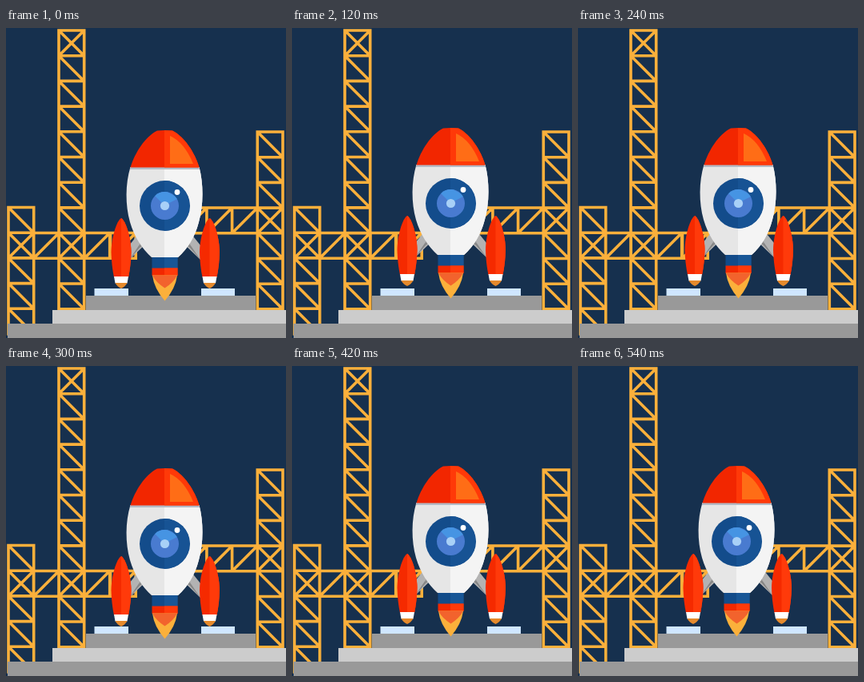
An HTML page for the animation above (600 ms loop, 350 by 388 pixels).

```html
<!DOCTYPE html>
<html lang="en">
<head>
<meta charset="utf-8">
<title>Rocket on the launch pad</title>
<style>
  html, body { margin: 0; width: 350px; height: 388px; overflow: hidden; background: #16304e; }
  svg { display: block; }
</style>
</head>
<body>
<svg width="350" height="388" viewBox="0 0 350 388">
  <defs>
    <clipPath id="rightHalf"><path d="M198 120H260V345H198z"/></clipPath>
    <clipPath id="lens"><circle cx="198.5" cy="222.5" r="17.5"/></clipPath>
    <g id="booster">
      <path d="M0 238C-6 241-12.5 264-12.5 281Q-12 298-9 312H9Q12 298 12.5 281C12.5 264 6 241 0 238z" fill="#f52a00"/>
      <path d="M0 238C6 241 12.5 264 12.5 281Q12 298 9 312H0z" fill="#ff3a0a"/>
      <path d="M-9 311H9L7.5 319.5H-7.5z" fill="#fff"/>
      <path d="M-7.5 319H7.5Q5 324 0 326Q-5 324-7.5 319z" fill="#e58a2c"/>
    </g>
  </defs>

  <path id="truss" fill="none" stroke="#fbb03b" stroke-width="3.6"/>

  <path d="M100 335H312V354H100zM2 370H350V388H2z" fill="#999"/>
  <path d="M58 353H350V370H58z" fill="#ccc"/>
  <path d="M110.500 326H153V335H110.500zM244 326H286V335H244z" fill="#cfe6ff"/>

  <g id="rocket">
    <path d="M170 252L154 272V290L177 268zM227 252L243 272V290L220 268z" fill="#b3b3b3"/>
    <path d="M169 253L167 275L177 268zM228 253L230 275L220 268zM154 290L167 275V271zM243 290L230 275V271z" fill="#858585"/>

    <path id="hull" d="M155.500 174C149 195 149 222 155 243Q163 270 182 287H215Q234 270 241 243C247 222 247 195 241.500 174z" fill="#e6e6e6"/>
    <use href="#hull" clip-path="url(#rightHalf)" style="filter:brightness(1.06)"/>
    <path d="M155.500 174H241.500L242.200 177H154.800z" fill="#b4bac5"/>
    <path d="M189 128.500Q198 127.500 208 128.500C223 136 236 156 241.500 174.500H155.500C161 156 174 136 189 128.500z" fill="#f22600"/>
    <path d="M198 128Q203 128 208 128.500C223 136 236 156 241.500 174.500H198z" fill="#ff3908"/>
    <path d="M205 135Q223 143 234 170H205z" fill="#ff6d16"/>

    <circle cx="198.500" cy="222.500" r="31.500" fill="#134c8b"/>
    <path d="M198 191A31.500 31.500 0 0 1 198 254z" fill="#175394"/>
    <circle cx="198.500" cy="222.500" r="17.500" fill="#497bd0"/>
    <path d="M198 222L184 208L198 203L216 213z" fill="#4694e3" clip-path="url(#lens)"/>
    <circle cx="198.500" cy="222.500" r="5.600" fill="#a8d0f7"/>
    <circle cx="214" cy="205.500" r="3.400" fill="#fff"/>

    <path d="M182.500 287H214.500V301H182.500z" fill="#124b89"/>
    <path d="M198 287H214.500V301H198z" fill="#185696"/>
    <path d="M182.500 300.500H214.500V310H182.500z" fill="#f22800"/>
    <path d="M198 300.500H214.500V310H198z" fill="#ff3a0a"/>
    <path d="M183 309.500H214Q212 326 198.500 341.500Q185 326 183 309.500z" fill="#fbb03b"/>
    <path d="M183 309.500H214Q210 318 198.500 325.500Q187 318 183 309.500z" fill="#f2632d"/>

    <use href="#booster" x="144"/>
    <use href="#booster" x="254.500"/>
  </g>
</svg>
<script>
  const CELL = 31.7;
  const bars = [];

  // One square cell; kind is any combination of "\" and "/".
  function cell(x, y, kind) {
    const r = x + CELL, b = y + CELL;
    bars.push(`M${x} ${y}H${r}V${b}H${x}z`);
    if (kind.includes("\\")) bars.push(`M${x} ${y}L${r} ${b}`);
    if (kind.includes("/")) bars.push(`M${x} ${b}L${r} ${y}`);
  }

  function tower(x, y, count, crossed) {
    for (let i = 0; i < count; i++)
      cell(x, y + i * CELL, crossed.includes(i) ? "\\/" : "\\");
  }

  tower(66, 3, 11, [0, 8]);
  tower(3, 224.5, 5, [1]);
  tower(314.300, 130, 7, [3]);
  for (const x of [34.500, 98, 130.500]) cell(x, 256.500, "/");
  for (const i of [1, 2, 3]) cell(314.300 - i * CELL, 225, "/");
  document.getElementById("truss").setAttribute("d", bars.join(""));

  // Shake offsets, one per 60 ms step.
  const STEP = 60;
  const shake = [[0, 0], [-2, 0], [0, -3], [0, 0], [2, -3], [0, 0], [-2, 0], [0, -3], [0, 0], [0, -3]];
  const rocket = document.getElementById("rocket");
  const start = performance.now();

  function draw() {
    const step = Math.floor((performance.now() - start) / STEP) % shake.length;
    rocket.setAttribute("transform", `translate(${shake[step]})`);
    requestAnimationFrame(draw);
  }
  draw();
</script>
</body>
</html>
```
